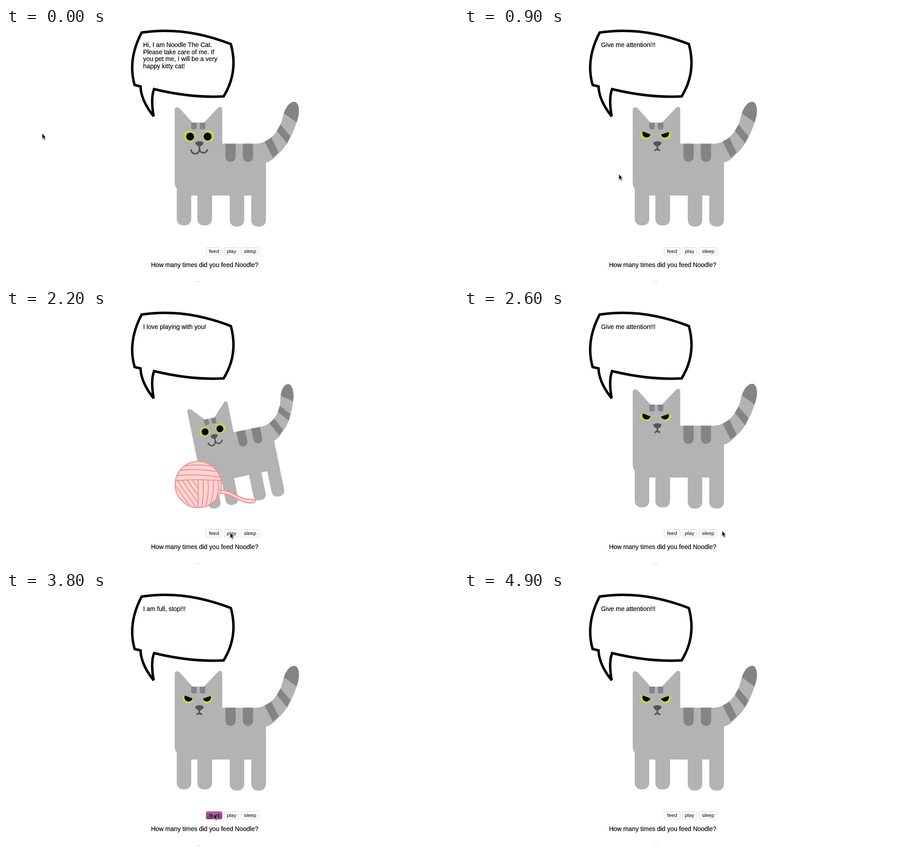
An HTML page that plays this animation: 998 px wide and 561 px high, repeating every 5.1 s.

```html
<!DOCTYPE html>
<html lang="en">
<head>
<meta charset="utf-8">
<title>Noodle The Cat</title>
<style>
  html, body { margin: 0; width: 100%; height: 100%; overflow: hidden; background: #fff; }
  svg { display: block; width: 998px; height: 561px; font: 13.85px "Liberation Sans", Arial, sans-serif; }
  text { stroke: #000; stroke-width: .2; }
  .fur { fill: #b3b3b3; }
  .stripe { fill: #848484; }
  .nose { fill: #555; }
  .line { fill: none; stroke: #555; stroke-width: 3.6; }
  .iris { fill: #c3d64b; }
  .yarn { fill: #ffd5d5; stroke: #f58a8a; stroke-width: 2.2; }
  .strand { fill: none; stroke: #f58a8a; stroke-width: 2; }
  .button { fill: #fff; stroke: #d2d2d2; stroke-width: .8; filter: drop-shadow(0 .6px .4px #0003); }
  .pressed { fill: url(#purple); stroke: #8b3b82; }
  .label { font-size: 11.4px; stroke: none; }
  #cursor { filter: drop-shadow(0 1px 1px #0006); }
</style>
</head>
<body>
<svg viewBox="0 0 998 561">
  <defs>
    <linearGradient id="purple" x2="0" y2="1">
      <stop stop-color="#b765ad"/><stop offset="1" stop-color="#8f2f83"/>
    </linearGradient>
    <clipPath id="tip"><path d="M600 150H670V229L642 209L613 188Z"/></clipPath>
    <clipPath id="leftLid"><path d="M380 222.7L425 240.3V260H380Z"/></clipPath>
    <clipPath id="rightLid"><path d="M423 239.5L468 224.3V260H423Z"/></clipPath>
    <clipPath id="ball"><circle cx="424.5" cy="385.5" r="51"/></clipPath>
    <clipPath id="ballLeft"><path d="M370 376.5H424V440H370Z"/></clipPath>
    <path id="tailShape" d="M553 255.5C580 254 604 230 611 197C615 180 624 163 637 163C646 164 649 180 645 197C638 225 621 261 603 276C592 288 583 296 574 297L553 300Z"/>
  </defs>

  <path fill="#fff" stroke="#000" stroke-width="5.5" d="M299.5 10Q395 -4.5 496.5 35.5Q513.5 98 480.5 151Q410 155 327 135Q319 155 326 195Q298 160 297 129L284 126Q268 70 299.5 10Z"/>
  <text id="speech"></text>

  <g id="cat">
    <path class="fur" d="M372.5 181Q372.5 175 378 175Q381 175 384 178L412 209H437L468 176.5Q470.5 174 473 174Q477.5 174 477.5 180V255.5H574V370H377V355Q372.5 349 372.5 342Z"/>
    <g class="fur">
      <rect x="377" y="340" width="32" height="96" rx="14"/>
      <rect x="422.5" y="340" width="32.5" height="96" rx="14"/>
      <rect x="494" y="340" width="32" height="98.5" rx="14"/>
      <rect x="541.5" y="340" width="32.5" height="98.5" rx="14"/>
    </g>
    <g class="stripe">
      <path d="M409 209h12v11q0 4 -4 4h-4q-4 0 -4 -4ZM428 209h12v11q0 4 -4 4h-4q-4 0 -4 -4Z"/>
      <path d="M484.5 255.5h22.6v29a11.3 11.3 0 0 1 -22.6 0ZM523 255.5h22.6v29a11.3 11.3 0 0 1 -22.6 0Z"/>
    </g>
    <g id="stripedTail">
      <use href="#tailShape" class="fur"/>
      <use href="#tailShape" class="stripe" clip-path="url(#tip)"/>
      <path class="stripe" d="M606 213L628 239L621 255L598 227ZM571 251L586 242L602 275L589 286Z"/>
    </g>
    <path class="nose" d="M417.5 254Q421 250 427 250Q433 250 436.5 254Q433 261.5 427 261.5Q421 261.5 417.5 254Z"/>
    <path id="smile" class="line" d="M427 260V268M408.5 268A9.25 10 0 0 0 427 268A9.25 10 0 0 0 445 268"/>
    <g id="openEyes">
      <g class="iris"><circle cx="405.3" cy="239" r="12.8"/><circle cx="446.8" cy="239" r="12.8"/></g>
      <circle cx="406.5" cy="239.7" r="8.8"/><circle cx="445" cy="239.7" r="8.8"/>
    </g>
    <g id="angryFace">
      <g clip-path="url(#leftLid)"><circle class="iris" cx="402" cy="233.7" r="12.6"/><circle cx="403" cy="232.8" r="9.2"/></g>
      <g clip-path="url(#rightLid)"><circle class="iris" cx="445" cy="233.7" r="12.6"/><circle cx="443.5" cy="232.8" r="9.2"/></g>
      <path class="line" d="M427 260V268M421 271.5Q424 267.5 427 268.5Q430 267.5 432.5 271.5"/>
    </g>
  </g>

  <g id="happyParts">
    <path class="fur" d="M555 253.5C582 252 606 230 613 195C617 175 624 163 635 163C646 163 651 176 649 189C644 212 624 255 604 273C594 285 585 293 575.5 295L555 300Z"/>
    <path class="stripe" d="M573.5 248L587.5 239L604.5 272L593 284Z"/>
    <path class="line" d="M394 242A10.5 10.5 0 0 1 415 242M442.5 243A10.5 10.5 0 0 1 463.5 243"/>
  </g>

  <g id="yarn">
    <path class="yarn" d="M470 397C505 398 512 423 553.5 418L547 426C518 430 502 405 470 404Z"/>
    <circle class="yarn" cx="424.5" cy="385.5" r="51"/>
    <g class="strand" clip-path="url(#ball)">
      <path d="M390 345Q424 339 460 346M378 355Q424 349 470 358M374 366Q424 361 476 370M372 377Q424 373 478 377"/>
      <path id="uprights"/>
      <path id="diagonals" clip-path="url(#ballLeft)"/>
    </g>
  </g>

  <g id="buttons"></g>
  <text x="320.2" y="528">How many times did you feed Noodle?</text>
  <rect x="418" y="560" width="10" height="1" fill="#ccc"/>
  <path id="cursor" stroke="#fff" stroke-width=".8" d="M0 0V11.7L2.6 9.3L4.6 13.8L6.7 12.9L4.8 8.5H8.3Z"/>
</svg>
<script>
const LOOP = 5100;
const $ = id => document.getElementById(id);
const svgNode = (tag, attrs, parent, text = '') => {
  const node = document.createElementNS('http://www.w3.org/2000/svg', tag);
  for (const key in attrs) node.setAttribute(key, attrs[key]);
  node.textContent = text;
  return parent.appendChild(node);
};

const addButton = (label, x, width, textX) => {
  const box = svgNode('rect', { x, y: 485, width, height: 16.5, rx: 3, class: 'button' }, $('buttons'));
  svgNode('text', { x: textX, y: 497, class: 'label' }, $('buttons'), label);
  return box;
};
const feedButton = addButton('feed', 442, 35, 448.3);
addButton('play', 482, 32, 487.5);
addButton('sleep', 519, 39.5, 525.3);

$('uprights').setAttribute('d', [0, 1, 2, 3, 4]
  .map(i => `M${424 + i * 11} 376q${1 + i} 30 ${-i * 3} 62`).join(''));
$('diagonals').setAttribute('d', [0, 1, 2, 3, 4, 5]
  .map(i => `M${412 - i * 11.5} 376q18 27 46 64`).join(''));

const speeches = {
  hello: 'Hi, I am Noodle The Cat.\nPlease take care of me. If\nyou pet me, I will be a very\nhappy kitty cat!',
  attention: 'Give me attention!!!',
  hungry: 'Give me food!',
  playing: 'I love playing with you!',
  yummy: 'Yummy, thank you!',
  filling: 'I feel full now.',
  full: 'I am full, stop!!!'
};

// Time, pointer x and y, then the new pose and speech when they change.
const steps = [
  [0, 80, 233, 'calm', 'hello'],
  [100, 165, 247], [200, 285, 263], [300, 400, 280, 'happy'],
  [500, 340, 298, 'angry', 'attention'], [600, 262, 311], [700, 196, 319],
  [800, 262, 324], [900, 342, 323], [1000, 420, 331, 'happy'],
  [1100, 432, 365], [1200, 441, 422], [1300, 450, 474, 'angry'],
  [1400, 457, 492, 'happy', 'hungry'], [1500, 458, 492],
  [1700, 468, 492], [1800, 479, 491], [1900, 488, 492],
  [2000, 494, 492, 'play', 'playing'], [2200, 495, 492],
  [2300, 510, 491], [2400, 533, 490], [2500, 553, 489, 'angry', 'attention'],
  [2600, 570, 488], [2700, 760, 470],
  [3100, 600, 484], [3200, 459, 490, 'happy', 'yummy'],
  [3500, 459, 490, 'calm', 'filling'], [3800, 459, 490, 'angry', 'full'],
  [4100, 455, 468], [4200, 448, 400, 'happy'], [4300, 432, 340],
  [4400, 394, 300], [4500, 355, 278, 'angry', 'attention'], [4600, 339, 262],
  [4800, 702, 70, 'happy'], [4900, -50, -50, 'angry']
];
steps.forEach((step, i) => {
  step[3] ??= steps[i - 1][3];
  step[4] ??= steps[i - 1][4];
});

const bodyTransforms = {
  happy: 'matrix(1.0098 0 0 1.0113 -3.65 -4.95)',
  play: 'matrix(.85 -.1745 .1745 .85 52.2 136.2)'
};
const show = (id, visible) => $(id).setAttribute('display', visible ? 'inline' : 'none');

let shown;
function draw(now) {
  const time = now % LOOP;
  const step = steps.findLast(s => s[0] <= time);
  const [, x, y, pose, speech] = step;
  feedButton.classList.toggle('pressed', time >= 3800 && time < 3900);
  if (step !== shown) {
    shown = step;
    $('cursor').setAttribute('transform', `translate(${x} ${y})`);
    $('cat').setAttribute('transform', bodyTransforms[pose] || '');
    show('stripedTail', pose !== 'happy');
    show('happyParts', pose === 'happy');
    show('openEyes', pose === 'calm' || pose === 'play');
    show('smile', pose !== 'angry');
    show('angryFace', pose === 'angry');
    show('yarn', pose === 'play');
    $('speech').textContent = '';
    speeches[speech].split('\n').forEach((line, i) =>
      svgNode('tspan', { x: 302.8, y: 42 + i * 15.6 }, $('speech'), line));
  }
  requestAnimationFrame(() => draw(performance.now() - start));
}
const start = performance.now();
draw(0);
</script>
</body>
</html>
```
